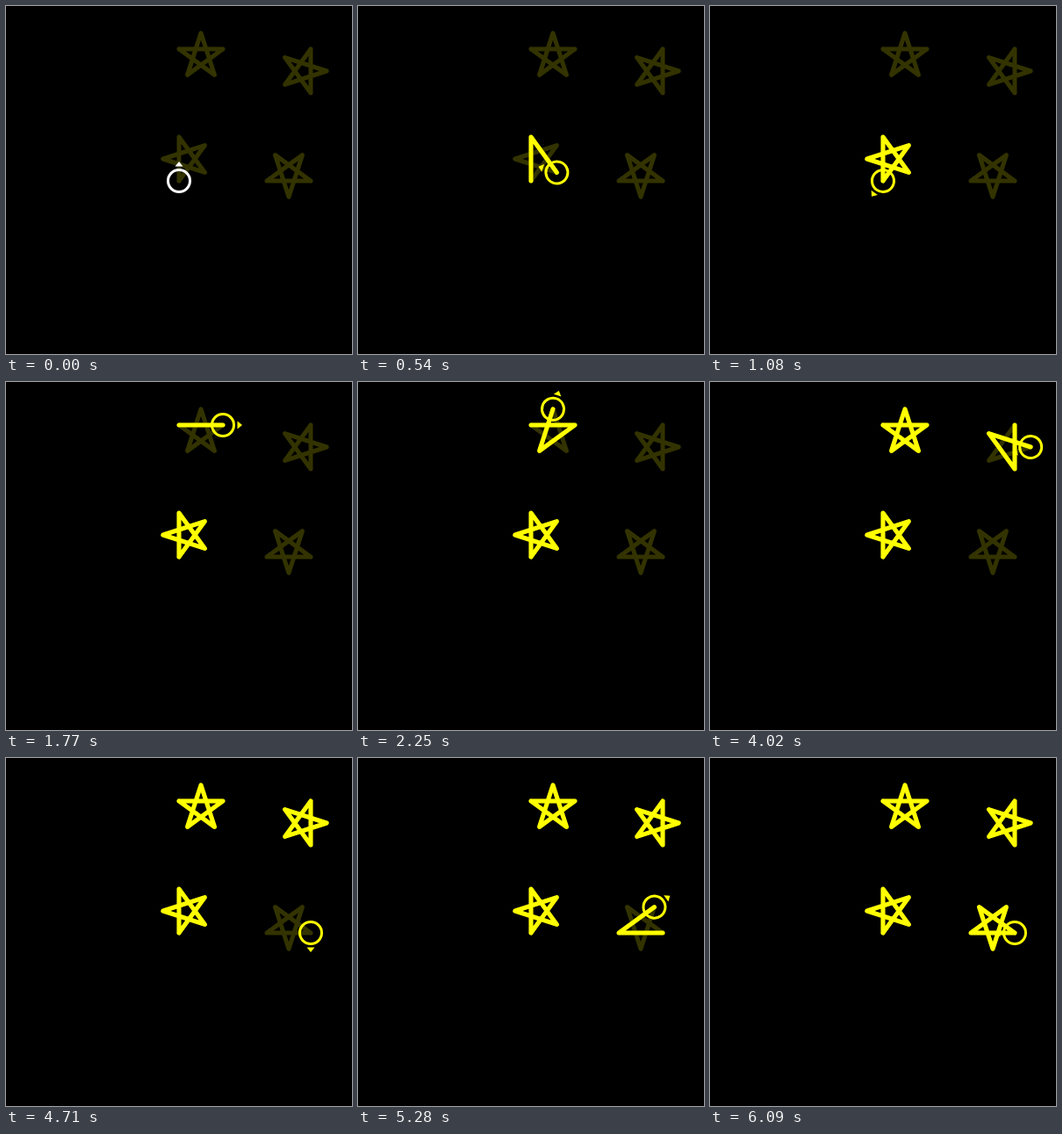
Write an HTML page with a canvas that moves like this. It is 394x396 px and loops after 6.24 s.

```html
<!DOCTYPE html>
<html lang="en">
<head>
<meta charset="utf-8">
<title>Turtle stars</title>
<style>
  html, body { margin: 0; width: 100%; height: 100%; overflow: hidden; background: #000; }
  canvas { display: block; }
</style>
</head>
<body>
<canvas id="stage" width="394" height="396"></canvas>
<script>
const ctx = document.getElementById('stage').getContext('2d');
const LOOP = 6240, TICK = 30;
const FIRST_COMMAND = 135, COMMAND_TIME = 350 / 3;
const YELLOW = '#ff0', GHOST = '#330';

const forward = distance => ({ distance, turn: 0 });
const right = turn => ({ distance: 0, turn });
const penUp = { distance: 0, turn: 0, pen: false };
const penDown = { distance: 0, turn: 0, pen: true };

const star = Array(5).fill([forward(50), right(144)]).flat();
const side = [...star, penUp, forward(150), right(90), penDown];
const program = [...side, ...side, ...side, ...star];

// Runs the first `count` commands, strokes the trail and returns the turtle.
function run(count, color) {
  const turtle = { x: 197, y: 199, heading: 0, pen: true };
  ctx.beginPath();
  ctx.moveTo(turtle.x, turtle.y);
  for (const { distance, turn, pen = turtle.pen } of program.slice(0, count)) {
    turtle.pen = pen;
    turtle.x += distance * Math.sin(turtle.heading);
    turtle.y -= distance * Math.cos(turtle.heading);
    turtle.heading += turn * Math.PI / 180;
    if (distance) ctx[pen ? 'lineTo' : 'moveTo'](turtle.x, turtle.y);
  }
  ctx.strokeStyle = color;
  ctx.lineWidth = 5;
  ctx.lineCap = ctx.lineJoin = 'round';
  ctx.stroke();
  return turtle;
}

function drawTurtle({ x, y, heading }, color) {
  ctx.save();
  ctx.translate(x, y);
  ctx.rotate(heading);
  ctx.strokeStyle = ctx.fillStyle = color;
  ctx.lineWidth = 3;
  ctx.beginPath();
  ctx.arc(0, 0, 12.5, 0, 2 * Math.PI);
  ctx.stroke();
  ctx.beginPath();
  ctx.moveTo(0, -22);
  ctx.lineTo(4.5, -16.5);
  ctx.lineTo(-4.5, -16.5);
  ctx.fill();
  ctx.restore();
}

function draw(now) {
  const t = Math.floor(now % LOOP / TICK) * TICK;
  const done = Math.max(0, Math.floor((t - FIRST_COMMAND) / COMMAND_TIME) + 1);
  ctx.fillStyle = '#000';
  ctx.fillRect(0, 0, 394, 396);
  run(program.length, GHOST);
  drawTurtle(run(done, YELLOW), t < TICK ? '#fff' : YELLOW);
}

const start = performance.now();
function tick() {
  draw(performance.now() - start);
  requestAnimationFrame(tick);
}
tick();
</script>
</body>
</html>
```
